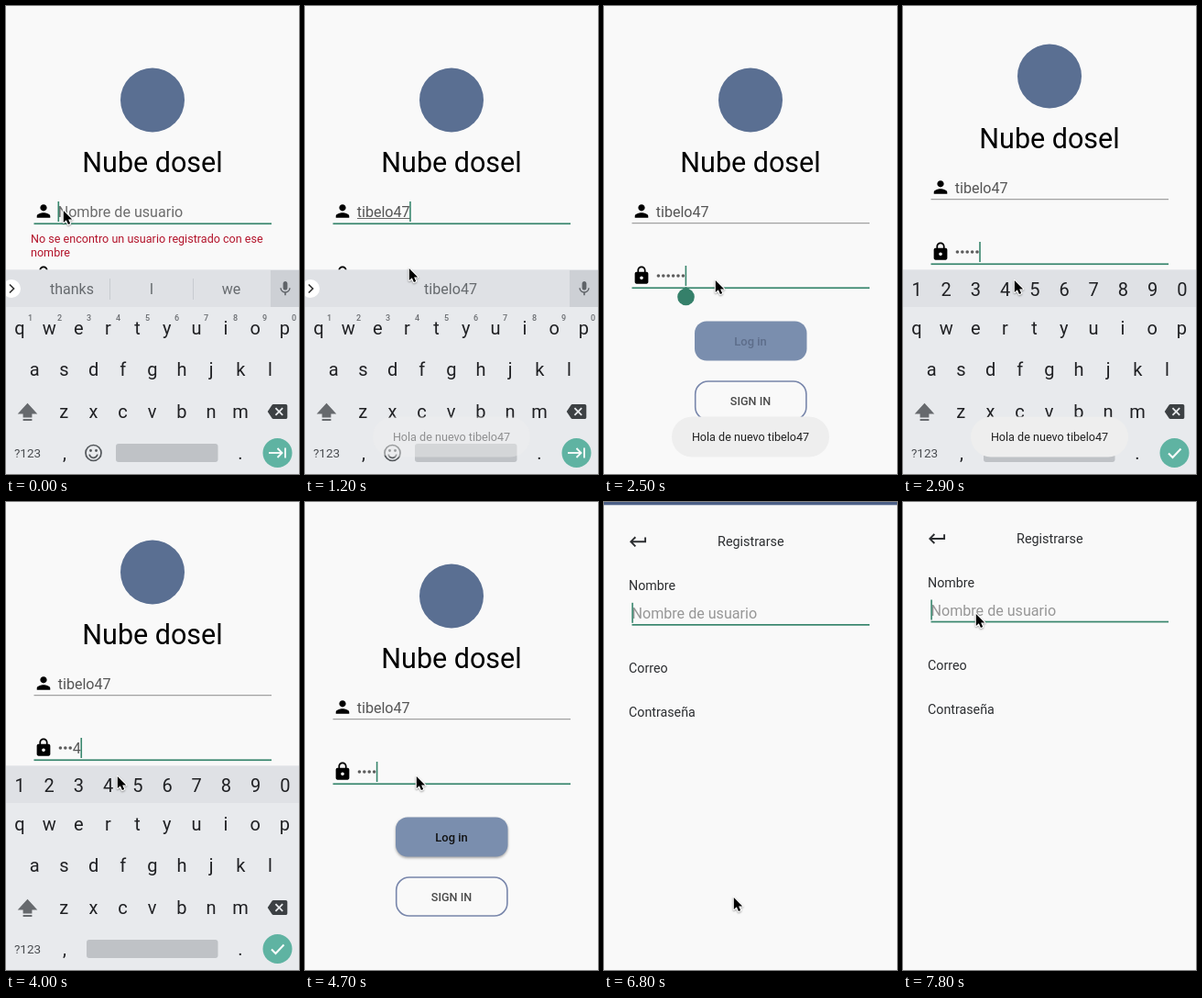
Write an HTML page with a canvas that moves like this. It is 320x510 px and loops after 8000 ms.

```html
<!DOCTYPE html>
<html lang="es">
<head>
<meta charset="utf-8">
<title>Login</title>
<style>
html, body { margin: 0; width: 320px; height: 510px; overflow: hidden; background: #f9f9f9; }
canvas { display: block; }
</style>
</head>
<body>
<canvas id="stage" width="320" height="510"></canvas>
<script>
const c = document.getElementById('stage').getContext('2d');
const LOOP = 8000, USER = 'tibelo47', BRAND = 'Nube dosel';
const GREEN = '#38866d', INK = '#2b2d30', KEY = '#202124';

const ICONS = {
  person: 'M12 12c2.21 0 4-1.79 4-4s-1.79-4-4-4-4 1.79-4 4 1.79 4 4 4zm0 2c-2.67 0-8 1.34-8 4v2h16v-2c0-2.66-5.33-4-8-4z',
  lock: 'M18 8h-1V6c0-2.76-2.24-5-5-5S7 3.24 7 6v2H6c-1.1 0-2 .9-2 2v10c0 1.1.9 2 2 2h12c1.1 0 2-.9 2-2V10c0-1.1-.9-2-2-2zm-6 9c-1.1 0-2-.9-2-2s.9-2 2-2 2 .9 2 2-.9 2-2 2zm3.1-9H8.9V6c0-1.71 1.39-3.1 3.1-3.1 1.71 0 3.1 1.39 3.1 3.1z',
  back: 'M19 7v4H5.83l3.58-3.59L8 6l-6 6 6 6 1.41-1.41L5.83 13H21V7z',
  erase: 'M22 3H7c-.69 0-1.23.35-1.59.88L0 12l5.41 8.11c.36.53.9.89 1.59.89h15c1.1 0 2-.9 2-2V5c0-1.1-.9-2-2-2zm-3 12.59L17.59 17 14 13.41 10.41 17 9 15.59 12.59 12 9 8.41 10.41 7 14 10.59 17.59 7 19 8.41 15.41 12z',
  mic: 'M12 14c1.66 0 3-1.34 3-3V5c0-1.66-1.34-3-3-3S9 3.34 9 5v6c0 1.66 1.34 3 3 3zm5.3-3c0 3-2.54 5.1-5.3 5.1S6.7 14 6.7 11H5c0 3.41 2.72 6.23 6 6.72V21h2v-3.28c3.28-.48 6-3.3 6-6.72z',
  shift: 'M12 2L1 14h6v4h10v-4h6zM7 19.6h10v2H7z'
};
for (const k in ICONS) ICONS[k] = new Path2D(ICONS[k]);
const ARROW = new Path2D('M0 0V14L3.3 11.2 5.6 16.3 8 15.2 5.8 10.3H10.2z');

// time, x, y
const PATH = [
  [0, 62, 222], [1000, 62, 222], [1150, 113, 285], [1250, 113, 285], [1600, 121, 298],
  [5000, 121, 298], [5200, 138, 372], [5400, 155, 433], [5700, 188, 446], [6000, 190, 438],
  [6400, 150, 432], [6600, 141, 430], [6900, 141, 430], [7300, 112, 250],
  [7600, 96, 124], [7800, 79, 121], [8000, 79, 121]
];

const clamp = v => Math.max(0, Math.min(1, v));
const ramp = (t, a, b) => clamp((t - a) / (b - a));
const ease = v => v * v * (3 - 2 * v);

function text(s, x, y, size, color, align = 'left', weight = 400) {
  c.font = `${weight} ${size}px Roboto, sans-serif`;
  c.textAlign = align;
  c.fillStyle = color;
  c.fillText(s, x, y + size * 0.355);
  return c.measureText(s).width;
}
const mid = (s, x, y, size, color, weight) => text(s, x, y, size, color, 'center', weight);

function rect(x, y, w, h, color) {
  c.fillStyle = color;
  c.fillRect(x, y, w, h);
}
function round(x, y, w, h, r) {
  c.beginPath();
  c.roundRect(x, y, w, h, r);
}
function disc(x, y, r, color) {
  c.beginPath();
  c.arc(x, y, r, 0, Math.PI * 2);
  c.fillStyle = color;
  c.fill();
}
function line(color, width, ...pts) {
  c.beginPath();
  for (let i = 0; i < pts.length; i += 2) c.lineTo(pts[i], pts[i + 1]);
  c.strokeStyle = color;
  c.lineWidth = width;
  c.stroke();
}
function icon(name, x, y, scale, color) {
  c.save();
  c.translate(x, y);
  c.scale(scale, scale);
  c.translate(-12, -12);
  c.fillStyle = color;
  c.fill(ICONS[name], 'evenodd');
  c.restore();
}
function underline(y, active) {
  if (active) rect(30.5, y - 0.6, 259.5, 1.7, GREEN);
  else rect(30.5, y - 0.8, 259.5, 1, '#8c8c8c');
}
const caret = (x, y) => rect(x, y, 1.6, 22, GREEN);

function caretOn(t) {
  if (t < 1300) return true;
  if (t < 2300) return t >= 1800;
  if (t < 4200) return true;
  if (t < 6800) return Math.floor((t - 4200) / 500) % 2 === 1;
  return t < 7300 || t >= 7800;
}

function typedName(t) {
  if (t < 400) return '';
  return USER.slice(0, [2, 4, 6, 7, 8][Math.min(4, Math.floor((t - 400) / 100))]);
}

// number of dots, then the visible last digit
function password(t) {
  if (t < 2900) return [6, ''];
  if (t < 3600) return [Math.max(0, 5 - Math.floor((t - 2900) / 100)), ''];
  if (t >= 4300) return [4, ''];
  const n = t < 3700 ? 1 : t < 3800 ? 2 : t < 4000 ? 3 : 4;
  return [n - 1, String(n)];
}

function passwordField(t) {
  const [n, digit] = password(t), active = t >= 2300;
  icon('lock', 41, 293.5, 0.92, '#000');
  for (let i = 0; i < n; i++) disc(59.4 + i * 5.4, 294, 1.8, '#5c5c5c');
  let end = 56.5 + n * 5.4;
  if (digit) end += text(digit, end, 294, 16.1, '#555');
  if (!n && !digit) text('Contraseña', 56.7, 294, 16.1, '#6c6c6c');
  underline(307, active);
  if (active && caretOn(t)) caret(end - 0.3, 283);
  if (active && t < 2800) {
    disc(89.5, 317, 9.3, '#35806a');
    c.beginPath();
    c.moveTo(89.5, 306);
    c.lineTo(96, 311);
    c.lineTo(83, 311);
    c.fill();
  }
}

function buttons(t) {
  const on = t >= 4000;
  c.save();
  if (on) {
    c.shadowColor = 'rgba(0,0,0,.35)';
    c.shadowBlur = 3;
    c.shadowOffsetY = 1.5;
  }
  round(99, 343.5, 122.5, 43, 13);
  c.fillStyle = '#7a8eae';
  c.fill();
  c.restore();
  mid('Log in', 160, 365.5, 12.9, on ? '#111' : '#5d6d8a', 500);
  round(99.7, 409, 121.2, 42, 14);
  c.strokeStyle = '#7886ab';
  c.lineWidth = 1.6;
  c.stroke();
  mid('SIGN IN', 160, 430.5, 12.6, '#4a4a4a', 500);
}

function login(t, shift) {
  c.save();
  c.translate(0, -shift);
  disc(160, 102.5, 35, '#5a6f92');
  mid(BRAND, 160, 170.5, 30.5, '#000');
  icon('person', 41, 223.5, 0.91, '#000');
  const name = typedName(t), active = t < 2300;
  const w = text(name || 'Nombre de usuario', 56.7, 224.5, 16.1, name ? '#555' : '#6c6c6c');
  if (name && t < 1800) rect(57, 231, w, 1, '#666');
  underline(237, active);
  if (active && caretOn(t)) caret(name ? 56.2 + w : 56.5, 213);
  if (t < 1000) {
    text('No se encontro un usuario registrado con ese', 27, 254, 12.58, '#b3142b');
    text('nombre', 27, 268.7, 12.58, '#b3142b');
  }
  passwordField(t);
  buttons(t);
  c.restore();
}

function strip(t) {
  rect(289, 288, 31, 40, '#cdd0d5');
  icon('mic', 305, 308, 0.8, '#5f6368');
  disc(6, 308, 10, '#fff');
  line('#333', 1.7, 4, 303.5, 8.5, 308, 4, 312.5);
  const name = typedName(t);
  if (name) return mid(name, 159, 308.5, 16.1, '#666a6e');
  ['thanks', 'I', 'we'].forEach((s, i) => mid(s, [72, 159, 246][i], 308.5, 16, '#666a6e'));
  rect(113, 297, 1, 23, '#c8cbd0');
  rect(204, 297, 1, 23, '#c8cbd0');
}

function smiley(x, y) {
  c.beginPath();
  c.arc(x, y, 8.5, 0, 7);
  c.strokeStyle = '#53575b';
  c.lineWidth = 1.7;
  c.stroke();
  disc(x - 3, y - 2.5, 1.4, '#53575b');
  disc(x + 3, y - 2.5, 1.4, '#53575b');
  c.beginPath();
  c.arc(x, y + 0.8, 4.5, 0.2, Math.PI - 0.2);
  c.stroke();
}

function keyboard(t, drop) {
  const pin = t >= 2600;
  c.save();
  c.translate(0, drop);
  rect(0, 287.5, 320, 223, '#e8eaed');
  rect(0, 287.5, 320, 40.5, '#dfe1e5');
  if (!pin) strip(t);
  [...'1234567890'].forEach((d, i) => {
    if (pin) mid(d, 15 + i * 32.2, 309, 20, KEY);
    else mid(d, 26.5 + i * 32, 340, 9, '#6b6e72', 500);
  });
  const row = (s, x, y) => [...s].forEach((k, i) => mid(k, x + i * 32.15, y, 20, KEY));
  row('qwertyuiop', 15, 351);
  row('asdfghjkl', 31.3, 396);
  row('zxcvbnm', 63.2, 442);
  icon('shift', 23.5, 442.5, 0.98, '#66696d');
  icon('erase', 296.5, 442, 0.9, '#3c4043');
  mid('?123', 23.5, 487.5, 13.5, '#4a4d51');
  mid(',', 64, 487, 20, KEY);
  mid('.', 256, 487, 20, KEY);
  if (!pin) smiley(95.5, 487);
  const left = pin ? 88 : 120;
  round(left, 477, 231.5 - left, 20, 3);
  c.fillStyle = '#bfc2c6';
  c.fill();
  disc(296.5, 487, 16, '#5fb3a2');
  if (pin) line('#fff', 2, 290, 487.5, 294.5, 492, 303.5, 482.5);
  else {
    line('#fff', 1.8, 287, 487, 301, 487);
    line('#fff', 1.8, 296.5, 482, 301.5, 487, 296.5, 492);
    line('#fff', 1.8, 305, 481.5, 305, 492.5);
  }
  c.restore();
}

function toast(t) {
  const a = ramp(t, 1110, 1310) * (1 - ramp(t, 3100, 3300));
  if (!a) return;
  c.globalAlpha = a;
  round(74, 447.5, 172, 44, 22);
  c.fillStyle = '#eeeeee';
  c.fill();
  mid('Hola de nuevo ' + USER, 160, 470, 12.6, '#222');
  c.globalAlpha = 1;
}

function register(t) {
  const y = 3.3 * (1 - ramp(t, 6810, 6900));
  if (y > 0) rect(0, 0, 320, y, '#4b5f86');
  c.save();
  c.translate(0, y);
  icon('back', 37.5, 40, 0.95, INK);
  mid('Registrarse', 160.3, 39.7, 14.4, INK);
  text('Nombre', 27, 88, 14.25, INK);
  text('Correo', 27, 177.5, 14.25, INK);
  text('Contraseña', 27, 226, 14.25, INK);
  text('Nombre de usuario', 30.5, 118, 16.1, '#979797');
  underline(130.3, true);
  if (caretOn(t)) caret(30.3, 106.5);
  c.restore();
}

function pointer(t) {
  let i = 1;
  while (i < PATH.length - 1 && PATH[i][0] < t) i++;
  const [a, ax, ay] = PATH[i - 1], [b, bx, by] = PATH[i];
  const k = ramp(t, a, b);
  c.save();
  c.translate(ax + (bx - ax) * k + 0.8, ay + (by - ay) * k + 1);
  c.scale(0.92, 0.92);
  c.shadowColor = 'rgba(0,0,0,.35)';
  c.shadowBlur = 2;
  c.shadowOffsetY = 1;
  c.strokeStyle = '#fff';
  c.lineWidth = 2.4;
  c.lineJoin = 'round';
  c.stroke(ARROW);
  c.shadowColor = 'transparent';
  c.fillStyle = '#000';
  c.fill(ARROW);
  c.restore();
}

function keyboardDrop(t) {
  const hidden = t < 2600 ? ramp(t, 1780, 2100) : t < 4200 ? 1 - ramp(t, 2600, 2900) : ramp(t, 4200, 4500);
  return 223 * ease(hidden);
}

function draw(t) {
  rect(0, 0, 320, 510, '#f9f9f9');
  if (t < 6800) {
    const drop = keyboardDrop(t);
    login(t, t >= 2700 && t < 4300 ? 26 : 0);
    if (drop < 223) keyboard(t, drop);
    toast(t);
  } else register(t);
  pointer(t);
}

const start = performance.now();
function tick(now) {
  draw(Math.max(0, now - start) % LOOP);
  requestAnimationFrame(tick);
}
draw(0);
requestAnimationFrame(tick);
</script>
</body>
</html>
```
